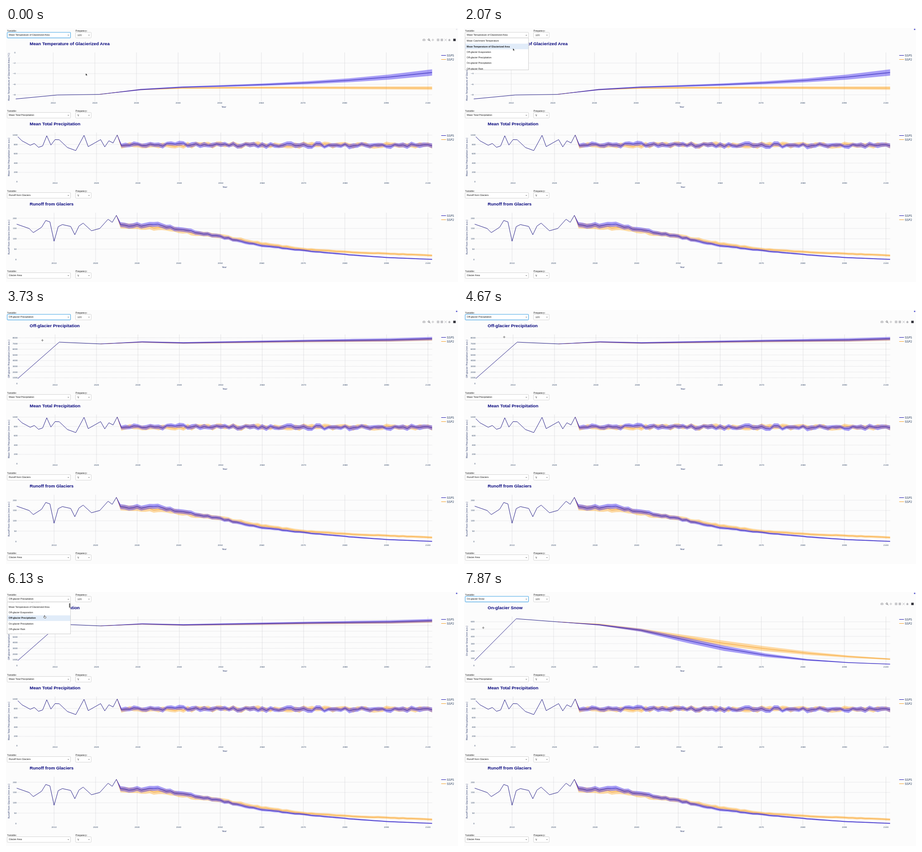
Recreate the animation shown at these times as an HTML page. Size 998 by 561 pixels, loop 8 s.

```html
<!DOCTYPE html>
<html lang="en">
<head>
<meta charset="utf-8">
<style>
html, body { margin: 0; width: 100%; height: 100%; overflow: hidden; background: #fcfcfc; }
svg { display: block; width: 998px; height: 561px; }
.tick { font: 4.35px "DejaVu Sans", sans-serif; fill: #2a3f5f; }
.axis { font: 4.92px "DejaVu Sans", sans-serif; fill: #1f2f66; }
.legend { font: 6.4px "DejaVu Sans", sans-serif; fill: #2a3f5f; }
.title { font: bold 9.75px "Liberation Sans", Arial, sans-serif; fill: #04047c; }
.label { font: 5.8px "Liberation Serif", serif; fill: #111; }
.value, .item { font: 5.25px "Liberation Sans", Arial, sans-serif; fill: #1a1a1a; }
.mid { text-anchor: middle; }
.end { text-anchor: end; }
</style>
</head>
<body>
<svg id="stage" viewBox="0 0 998 561" xmlns="http://www.w3.org/2000/svg"></svg>
<script>
const LOOP = 8000, RIGHT = 940.8, ROW = 177;
const BLUE = '#2016b0', ORANGE = '#f5a028';
const MENU_TOP = 22.3, ITEM_H = 12.3;
const items = ['Mean Catchment Temperature', 'Mean Temperature of Glacierized Area',
  'Off-glacier Evaporation', 'Off-glacier Precipitation', 'On-glacier Precipitation',
  'Off-glacier Rain', 'Off-glacier Snow', 'On-glacier Rain', 'On-glacier Snow', 'Mean Snow Cover'];

let seed = 11;
const rand = () => (seed = (seed * 16807) % 2147483647) / 2147483647;
const jitter = a => (rand() * 2 - 1) * a;
const range = (a, b, step = 1) => Array.from({ length: Math.floor((b - a) / step) + 1 }, (_, i) => a + i * step);
const smooth = u => u * u * (3 - 2 * u);
const bell = (u, mid, w) => Math.exp(-(((u - mid) / w) ** 2));

// Piecewise value of column c over rows [key, v1, v2, ...]
function at(rows, k, c = 1, ease = u => u) {
  if (k <= rows[0][0]) return rows[0][c];
  for (let i = 1; i < rows.length; i++) {
    const a = rows[i - 1], b = rows[i];
    if (k <= b[0]) return a[c] + (b[c] - a[c]) * ease((k - a[0]) / (b[0] - a[0]));
  }
  return rows[rows.length - 1][c];
}

const text = (x, y, cls, s, extra = '') => `<text x="${x}" y="${y}" class="${cls}" ${extra}>${s}</text>`;
const path = pts => 'M' + pts.map(p => p[0].toFixed(2) + ' ' + p[1].toFixed(2)).join('L');
const stroke = (pts, color) =>
  `<path d="${path(pts)}" fill="none" stroke="${color}" stroke-width=".95" stroke-linejoin="round"/>`;
const band = (rows, color, alpha) => {
  const up = rows.map(r => [r[0], r[1] - r[2]]), low = rows.map(r => [r[0], r[1] + r[2]]).reverse();
  return `<path d="${path(up.concat(low))}Z" fill="${color}" fill-opacity="${alpha}"/>`;
};

// past: [year, value]; hot and mild: year => [value, half width of the band in px]
function chart({ top, x0, zero, scale, ticks, name, unit, past, years, hot, mild }) {
  const X = year => x0 + (year - 2001) * (RIGHT - x0) / 100;
  const Y = v => zero - v * scale;
  const bottom = top + 108, cx = (x0 + RIGHT) / 2;
  let s = '';
  for (const year of range(2010, 2100, 10)) {
    const x = X(year).toFixed(2);
    s += `<path d="M${x} ${top}V${bottom}" stroke="#dcdcdf" stroke-width=".8"/>`;
    s += text(x, bottom + 5.1, 'tick mid', year);
  }
  for (const v of ticks) {
    if (v) s += `<path d="M${x0} ${Y(v)}H${RIGHT}" stroke="#c6c6cc" stroke-width=".7" stroke-dasharray="1 1"/>`;
    s += text(x0 - .4, Y(v) + 1.6, 'tick end', String(v).replace('-', '\u2212'));
  }
  const history = past.map(([year, v]) => [X(year), Y(v)]);
  const fork = [...history[history.length - 1], 0];
  const future = rule => [fork, ...years.map(year => {
    const [v, w] = rule(year);
    return [X(year), Y(v), w];
  })];
  const m = future(mild), h = future(hot);
  s += band(m, '#ffa31a', .4) + stroke(m, ORANGE) + band(h, '#5540f2', .5);
  s += stroke(h, BLUE) + stroke(history, '#17107f');
  s += text(52.3, top - 15.7, 'title', name);
  s += text(cx, bottom + 14.3, 'axis mid', 'Year');
  s += text(0, 0, 'axis mid', `${name} [${unit}]`, `transform="translate(8.2 ${top + 54}) rotate(-90)"`);
  [['SSP5', BLUE], ['SSP2', ORANGE]].forEach(([label, color], i) => {
    const y = top + 6.5 + i * 9;
    s += `<path d="M961 ${y}H971.5" stroke="${color}" stroke-width="1"/>` + text(973.3, y + 2.4, 'legend', label);
  });
  return s;
}

// Charts averaged by decade; rules get u = 0..1 over 2031..2101
const decadeChart = o => chart({ ...o, top: 54, years: range(2031, 2101, 10),
  past: [2001, 2011, 2021].map((year, i) => [year, o.past[i]]),
  hot: year => o.hot((year - 2031) / 70),
  mild: year => o.mild((year - 2031) / 70) });

const wetTrend = [[0, 7275], [1 / 7, 7110], [4 / 7, 7465], [6 / 7, 7645], [1, 7855]];
const topCharts = [
  decadeChart({ x0: 21.5, zero: 54, scale: 11.7, ticks: range(-8, 0, 2), name: items[1], unit: '°C',
    past: [-8.78, -8.03, -7.92],
    hot: u => [-7.01 + 1.2 * Math.sqrt(u) + 2.03 * u ** 3, 1.6 + 5.4 * u * u],
    mild: u => [-7.01 + 1.03 * Math.sqrt(u) - .75 * u, 1.3 + 2.4 * u] }),
  decadeChart({ x0: 26, zero: 162.3, scale: .01262, ticks: range(0, 8000, 1000), name: items[3], unit: 'mm w.e.',
    past: [860, 7235, 6925],
    hot: u => [at(wetTrend, u), 1.3 + 2.4 * u],
    mild: u => [at(wetTrend, u) - 25 - 100 * u, 1.3 + 1.7 * u] }),
  decadeChart({ x0: 23.6, zero: 162.3, scale: .1608, ticks: range(0, 600, 100), name: items[8], unit: 'mm w.e.',
    past: [67, 642, 599],
    hot: u => [558 * Math.exp(-3.41 * u ** 1.63), .6 + 5.4 * bell(u, .38, .28)],
    mild: u => [562 * Math.exp(-1.87 * u ** 1.32), 1.2 + 4.6 * bell(u, .45, .35)] })
];

const years = range(2026, 2101);
const rain = chart({ top: 54 + ROW, x0: 26, zero: 339.4, scale: .1028, ticks: range(0, 1000, 200),
  name: 'Mean Total Precipitation', unit: 'mm w.e.', years,
  past: [[2001, 967], [2002, 879], [2004, 782], [2005, 821], [2006, 738], [2007, 767], [2008, 986],
    [2009, 787], [2010, 904], [2011, 901], [2013, 733], [2015, 668], [2017, 996], [2018, 753],
    [2021, 904], [2022, 748], [2023, 879], [2024, 831], [2025, 1003]],
  hot: year => [782 + 18 * bell(year, 2038, 9) + jitter(38), 4.6 + jitter(.9)],
  mild: () => [784 + jitter(30), 4.8 + jitter(.9)] });

const meltHot = [[2026, 165], [2035, 167], [2041, 143], [2050, 110], [2060, 66], [2070, 43], [2080, 24], [2090, 9], [2101, 0]];
const meltMild = [[2026, 163], [2036, 154], [2044, 128], [2050, 112], [2060, 76], [2070, 49.5], [2080, 36], [2101, 19]];
const melt = (keys, year, w) => {
  const v = at(keys, year);
  return [v + jitter(v * .03), w + .025 * v];
};
const runoff = chart({ top: 54 + 2 * ROW, x0: 23.6, zero: 511, scale: .4545, ticks: range(0, 200, 50),
  name: 'Runoff from Glaciers', unit: 'mm w.e.', years,
  past: [[2001, 171], [2004, 150], [2005, 130], [2007, 156], [2008, 189], [2009, 182], [2010, 88],
    [2011, 159], [2012, 169], [2014, 160], [2015, 120], [2016, 162], [2017, 176], [2019, 139],
    [2021, 150], [2023, 195], [2024, 180], [2025, 214]],
  hot: year => melt(meltHot, year, 1.2),
  mild: year => melt(meltMild, year, 2) });

const arrow = (x, y, id = '') => `<path ${id} d="M${x - 1.8} ${y - .9}h3.6l-1.8 2z" fill="#8a8a8a"/>`;
const box = (x, y, w, id = '') =>
  `<rect ${id} x="${x}" y="${y}" width="${w}" height="12.4" rx="1.5" fill="#fff" stroke="#cbcbcb" stroke-width=".8"/>`;
function controls(i, variable, freq) {
  const y = i * ROW, mark = n => i ? '' : `id="${n}"`;
  return text(2.6, y + 8, 'label', 'Variable:') + text(153.5, y + 8, 'label', 'Frequency:')
    + box(2.7, y + 9.5, 139.8, mark('field')) + box(153.6, y + 9.5, 34.6)
    + text(6.3, y + 17.4, 'value', variable, mark('chosen')) + text(157.6, y + 17.6, 'label', freq)
    + arrow(137.6, y + 15.8, mark('caretMark')) + arrow(183.2, y + 15.8);
}

const modebar = `<g id="modebar" fill="#b4b4b8">
<path d="M920 24.5h1.5l.6-.8h1.8l.6.8h1.3v4h-5.8z"/><circle cx="922.9" cy="26.4" r="1.1" fill="#fcfcfc"/>
<g fill="none" stroke="#66666c"><circle cx="933.6" cy="25.8" r="1.8"/><path d="M935 27.2l2 2"/></g>
<path d="M939.7 26.3h5.6M942.5 23.5v5.6" stroke="#b4b4b8" stroke-width=".9"/>
<rect x="951.5" y="23.8" width="5" height="5"/><path d="M952.6 26.3h2.8M954 24.9v2.8" stroke="#fff" stroke-width=".7"/>
<rect x="959.8" y="23.8" width="5" height="5"/><path d="M960.9 26.3h2.8" stroke="#fff" stroke-width=".7"/>
<path d="M968.2 23.8l5 5M973.2 23.8l-5 5" stroke="#b4b4b8" stroke-width=".9"/>
<path d="M976.2 26.4l2.8-2.7 2.8 2.7h-.8v2.4h-4v-2.4z"/>
<rect x="987.5" y="23.7" width="5.4" height="5.2" fill="#33333b"/></g>`;

const menu = `<g id="menu"><rect x="2.7" y="22" width="139.8" height="70.6" fill="#fff" stroke="#c4c4c4" stroke-width=".8"/>
<g clip-path="url(#menuClip)"><g id="list"><rect id="hover" x="3.1" width="139" height="${ITEM_H}" fill="#e1ecf9"/>`
  + items.map((s, i) => text(6.1, (MENU_TOP + i * ITEM_H + 7.9).toFixed(2), 'item', s)).join('')
  + `</g><rect id="thumb" x="139.2" width="2.7" height="10" rx="1.2" fill="#6c6c6c"/></g></g>`;

const pointers = `<path id="arrowPtr" d="M0 0v5.2l1.3-1.1.9 2 .9-.4-.9-1.9h1.7z" fill="#111" stroke="#fff" stroke-width=".4"/>
<path id="handPtr" d="M-.6-2.6q.6-.6 1.1 0l.2 2 2 .5q.7.2.6 1l-.5 2.2h-3.2l-1.7-2.4q0-.8.9-.4l.5.4z" fill="#fff" stroke="#222" stroke-width=".7"/>
<path id="crossPtr" d="M-2.6 0h5.2M0-2.6v5.2" stroke="#555" stroke-width=".8"/>`;

const stage = document.getElementById('stage');
stage.innerHTML = `<defs><clipPath id="menuClip"><rect x="3" y="22.4" width="139.2" height="69.9"/></clipPath></defs>
<rect width="998" height="561" fill="#fcfcfc"/>`
  + topCharts.map((s, i) => `<g id="top${i}">${s}</g>`).join('') + rain + runoff
  + controls(0, items[1], '10Y') + controls(1, 'Mean Total Precipitation', 'Y')
  + controls(2, 'Runoff from Glaciers', 'Y') + controls(3, 'Glacier Area', 'Y')
  + modebar + menu + '<path id="caret" d="M6.2 12.8v5.6" stroke="#222" stroke-width=".6"/>'
  + '<circle id="dot" cx="995" cy="3" r="1.6"/>' + pointers;

const $ = id => document.getElementById(id);
const show = (id, on) => $(id).setAttribute('display', on ? 'inline' : 'none');
const labels = [...stage.querySelectorAll('.item')];

// Pointer stops: time, x, y
const track = [[250, 176, 100], [950, 138.8, 20], [1500, 138.8, 20], [2600, 80.7, 67],
  [4450, 80.2, 67], [5350, 136.8, 19.3], [5750, 136.8, 19.3], [6450, 45.5, 81.8], [7300, 45.5, 81.8], [7700, 42.5, 79]];
const scrollKeys = [[6000, 0], [6500, 44.7]];
const picks = [1, 3, 8];

function draw(t) {
  const x = at(track, t, 1, smooth), y = at(track, t, 2, smooth);
  const first = t >= 1300 && t < 3350, second = t >= 5400 && t < 7250;
  const open = first || second;
  const pick = picks[t < 3350 ? 0 : t < 7250 ? 1 : 2];
  const plot = t < 3500 ? 0 : t < 7400 ? 1 : 2;
  topCharts.forEach((_, i) => show('top' + i, i === plot));

  $('chosen').textContent = items[pick];
  $('field').setAttribute('stroke', open ? '#cbcbcb' : '#49a7e6');
  $('field').setAttribute('stroke-width', open ? .8 : 1.1);
  $('caretMark').setAttribute('transform', open ? 'rotate(180 137.6 15.8)' : '');
  show('caret', second && y < MENU_TOP);
  show('modebar', !open && y > 24);
  $('dot').setAttribute('fill', t < 400 ? '#e4e4ea' : '#4a4acb');

  show('menu', open);
  const scroll = at(scrollKeys, t, 1, smooth);
  const over = y > MENU_TOP ? Math.floor((y + scroll - MENU_TOP) / ITEM_H) : pick;
  $('list').setAttribute('transform', `translate(0 ${-scroll})`);
  $('hover').setAttribute('y', MENU_TOP + over * ITEM_H);
  labels.forEach((el, i) => el.style.fontWeight = i === pick ? 'bold' : 'normal');
  $('thumb').setAttribute('y', 23.6 + scroll / 7);
  show('thumb', second && t > 6000 && t < 7000);

  const cross = !open && y > 54 && t > 70;
  const hand = !cross && (y < 23 || second);
  const kinds = { crossPtr: cross, handPtr: hand, arrowPtr: !cross && !hand };
  for (const id in kinds) {
    show(id, kinds[id]);
    $(id).setAttribute('transform', `translate(${x} ${y})`);
  }
}

const start = performance.now();
function loop(now) {
  draw(Math.max(0, now - start) % LOOP);
  requestAnimationFrame(loop);
}
draw(0);
requestAnimationFrame(loop);
</script>
</body>
</html>
```
